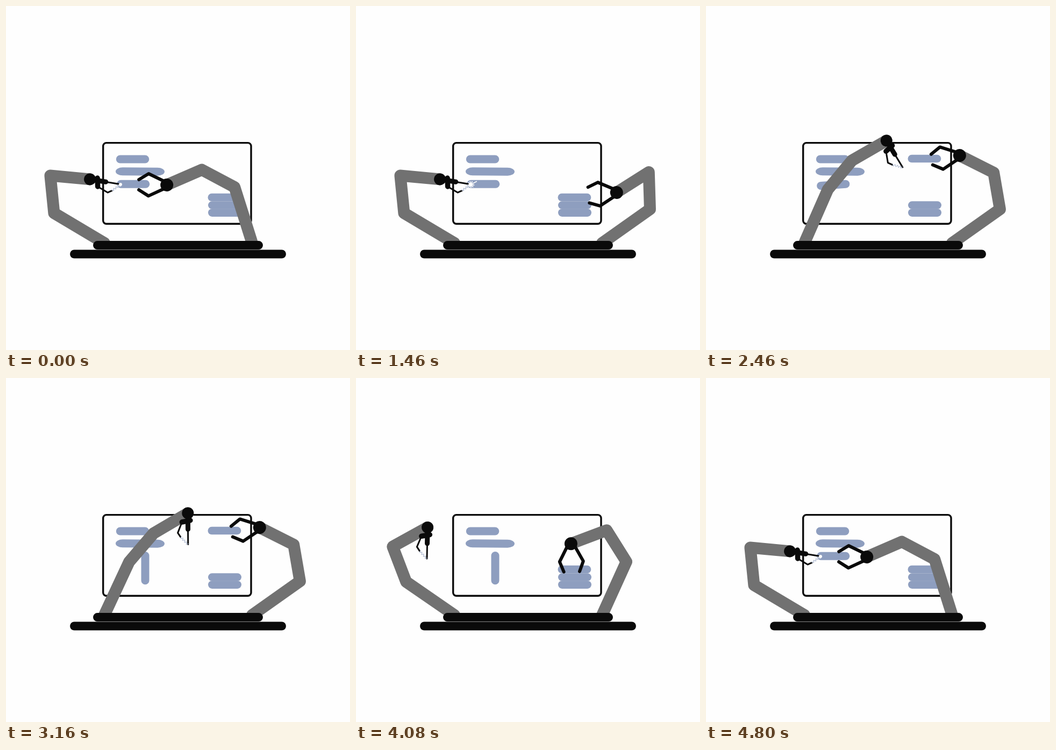
An HTML page with a canvas that plays this animation: 640 px wide and 640 px high, repeating every 4.82 s.

```html
<!DOCTYPE html>
<html>
<head>
<meta charset="utf-8">
<style>
html, body { margin: 0; height: 100%; overflow: hidden; background: #fefefe; }
canvas { display: block; width: 640px; height: 640px; }
</style>
</head>
<body>
<canvas id="stage" width="640" height="640"></canvas>
<script>
const ctx = document.getElementById('stage').getContext('2d');
const LOOP = 4820;
const WHITE = '#fefefe', BLACK = '#0a0a0a', GREY = '#717171', BLUE = '#8e9ebf';
const rad = Math.PI / 180;

// Smooth progress from 0 to 1 between two times
function ease(t, start, end) {
  const u = Math.min(1, Math.max(0, (t - start) / (end - start)));
  return u * u * (3 - 2 * u);
}

// A pose is shoulder, elbow, forearm and wrist angle (each relative to the
// segment before), then grip opening. Every move adds its own turn.
const right = {
  base: [458, 441], lengths: [109, 69, 71],
  rest: [-107.5, -44.5, -51.5, 24, 0],
  moves: [
    { start: 200, end: 760, turn: [0, 0, 0, -54, 1] },           // aim
    { start: 720, end: 1460, turn: [72.2, 3, 0, 0, 0] },         // swing
    { start: 1250, end: 1450, turn: [0, -15, -69, 57, 0] },      // curl
    { start: 1560, end: 2140, turn: [0, -8, 67, -62, -0.9] },    // lift
    { start: 3640, end: 4060, turn: [-30.3, 8, -25, -36, 0.9] }  // lower
  ],
  home: [4080, 4540]
};
const left = {
  base: [183, 441], lengths: [109, 70, 74],
  rest: [-149.2, 53.5, 101, 4],
  moves: [
    { start: 1720, end: 2520, turn: [84.2, -38, -82, 86] },      // reach
    { start: 2720, end: 3060, turn: [0, 0, 0, 30] },             // point down
    { start: 3250, end: 4070, turn: [-80.4, 19, 63, 0] }         // retreat
  ],
  home: [4320, 4760]
};

function poseAt(arm, t) {
  const away = 1 - ease(t, ...arm.home);
  return arm.rest.map((angle, i) => angle + away * arm.moves.reduce(
    (sum, m) => sum + m.turn[i] * ease(t, m.start, m.end), 0));
}

function line(points, width, color = BLACK) {
  ctx.beginPath();
  points.forEach(p => ctx.lineTo(...p));
  ctx.lineWidth = width;
  ctx.strokeStyle = color;
  ctx.stroke();
}

function dot(x, y, r, color = BLACK) {
  ctx.beginPath();
  ctx.arc(x, y, r, 0, 7);
  ctx.fillStyle = color;
  ctx.fill();
}

function placed(x, y, degrees, paint) {
  ctx.save();
  ctx.translate(x, y);
  ctx.rotate(degrees * rad);
  paint();
  ctx.restore();
}

function bar(x, y, w, h = 15, rx = h / 2) {
  ctx.beginPath();
  ctx.roundRect(x, y, w, h, [{ x: rx, y: h / 2 }]);
  ctx.fillStyle = BLUE;
  ctx.fill();
}

function drawArm(arm, t, drawTool) {
  const pose = poseAt(arm, t);
  let [x, y] = arm.base, angle = 0;
  const points = [[x, y]];
  arm.lengths.forEach((length, i) => {
    angle += pose[i];
    x += length * Math.cos(angle * rad);
    y += length * Math.sin(angle * rad);
    points.push([x, y]);
  });
  line(points, 22, GREY);
  placed(x, y, angle + pose[3], () => drawTool(t, pose[4]));
}

function gripper(t, open) {
  for (const side of [-1, 1]) {
    line([[3, 6 * side], [34 - open, (20.7 + 1.3 * open) * side],
          [52, (9.5 + 5.2 * open) * side]], 6);
  }
  dot(0, 0, 12);
}

function cutter(t) {
  line([[13.5, -4.5], [16.5, 11]], 9.5);
  line([[10, 0], [30, 0]], 9);
  line([[30, 0], [58, 0]], 3);
  line([[19, 12], [36.5, 19], [44, 14]], 3);
  const zigzag = Array.from({ length: 9 }, (_, i) => {
    const side = i % 2 ? 1.4 : -1.4;
    return [44 + i * 1.8 + side, 14 - i * 1.7 + side];
  });
  if (cutting(t)) line(zigzag, 2, WHITE);
  line(zigzag, 0.8, BLUE);
  dot(0, 0, 11);
}

const cutting = t => t < 1660 || t > 4770;

// White rays pulsing outwards around the cutting point
function sparks(t) {
  const phase = t % 160 / 160;
  dot(213, 332, 3, WHITE);
  if (phase < 0.02) return;
  const reach = 5 + 5 * phase;
  for (let i = 0; i < 9; i++) {
    const a = i * 40 * rad + 0.2;
    const ray = r => [214 + r * Math.cos(a), 332 + r * Math.sin(a)];
    line([ray(reach - 4), ray(reach + (i === 8 ? 6 : 0))], 1.7, WHITE);
  }
}

function bars(t) {
  bar(204.8, 277.5, 61.5);
  placed(249.5, 308, 0.4, () => bar(-45.5, -7.5, 91, 15, 13));
  const hang = ease(t, 2375, 3060) - ease(t, 4360, 4740);
  placed(259, 331.3, -90 * hang, () => bar(-53, -7.5, 61.3));
  const raised = ease(t, 1600, 2140) - ease(t, 3640, 4060);
  bar(376, 363.3, 62, 14.5);
  bar(376, 377.2, 62, 14.8);
  bar(375.5, 348.8 - 72 * raised, 61.8, 14.5);
}

function draw(t) {
  ctx.fillStyle = WHITE;
  ctx.fillRect(0, 0, 640, 640);
  ctx.lineCap = ctx.lineJoin = 'round';

  bars(t);
  ctx.beginPath();
  ctx.roundRect(180.7, 254.6, 275.3, 150.6, 6);
  ctx.lineWidth = 3.4;
  ctx.strokeStyle = BLACK;
  ctx.stroke();

  drawArm(left, t, cutter);
  if (cutting(t)) sparks(t);
  drawArm(right, t, gripper);

  line([[170, 445.1], [470, 445.1]], 16);
  line([[127, 461.5], [513, 461.5]], 16);
  line([[170, 453.3], [470, 453.3]], 0.6, '#777');
}

function frame() {
  draw(performance.now() % LOOP);
  requestAnimationFrame(frame);
}
frame();
</script>
</body>
</html>
```
